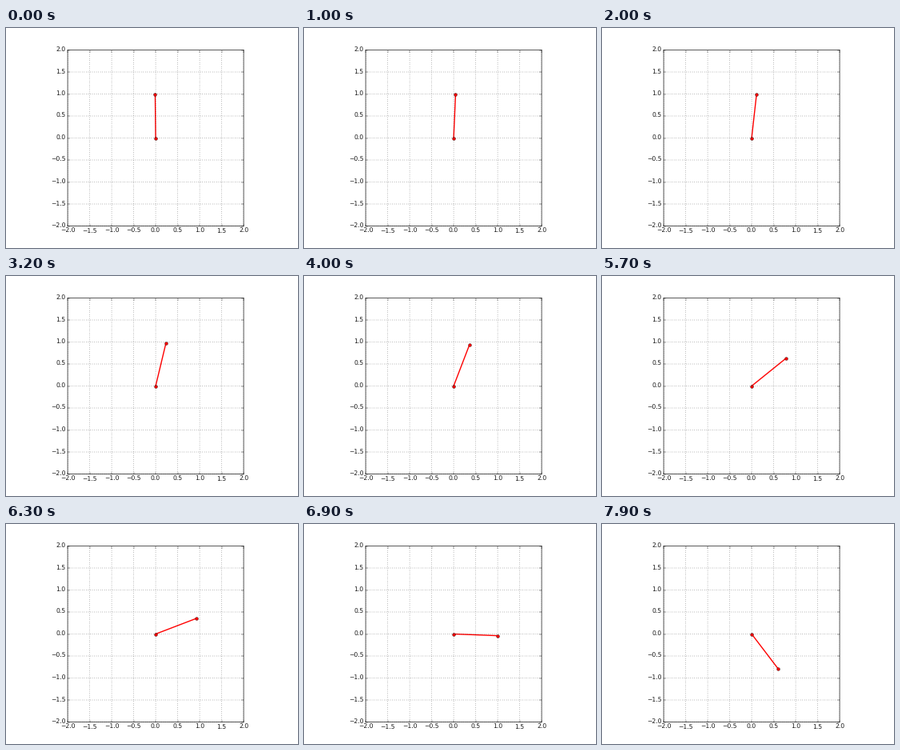
Animation, 365 px wide and 275 px high, one loop 8 s. Source, as a matplotlib script:

```python
import numpy as np
import matplotlib.pyplot as plt
from matplotlib.animation import FuncAnimation

FRAMES, INTERVAL = 80, 100
GRAVITY, LENGTH = 9.81, 1.0
DT = 1 / 60                      # simulated time per frame
START = np.array([-0.011, 0.325])  # angle from upright, angular speed

plt.style.use("classic")
plt.rcParams.update({
    "font.family": "DejaVu Sans",
    "font.size": 11,
    "text.hinting": "no_hinting",
    "figure.facecolor": "white",
    "savefig.facecolor": "white",
    "savefig.dpi": "figure",
    "axes.linewidth": 0.92,
    "lines.scale_dashes": False,
    "path.snap": False,          # soft, unrounded edges
})


def slope(state):
    angle, speed = state
    return np.array([speed, GRAVITY / LENGTH * np.sin(angle)])


def rk4(state, h):
    k1 = slope(state)
    k2 = slope(state + h / 2 * k1)
    k3 = slope(state + h / 2 * k2)
    k4 = slope(state + h * k3)
    return state + h / 6 * (k1 + 2 * k2 + 2 * k3 + k4)


def swing():
    state, angles = START, []
    for _ in range(FRAMES):
        angles.append(state[0])
        state = rk4(state, DT)
    return angles


angles = swing()

fig = plt.figure(figsize=(7.3, 5.5), dpi=50)
ax = fig.add_subplot(111, aspect="equal", xlim=(-2, 2), ylim=(-2, 2))
ticks = np.arange(-2, 2.1, 0.5)
ax.set_xticks(ticks)
ax.set_yticks(ticks)
ax.tick_params(labelcolor="0.1")
ax.grid(color="black", linewidth=0.6, linestyle=(0, (0.92, 2.75)))
rod, = ax.plot([], [], "ro-", linewidth=2, markersize=5.5, markeredgewidth=0.5)


def update(i):
    a = angles[i]
    rod.set_data([0, LENGTH * np.sin(a)], [0, LENGTH * np.cos(a)])
    return rod,


anim = FuncAnimation(fig, update, frames=FRAMES, interval=INTERVAL,
                     repeat=True, repeat_delay=0)
plt.show()
```
